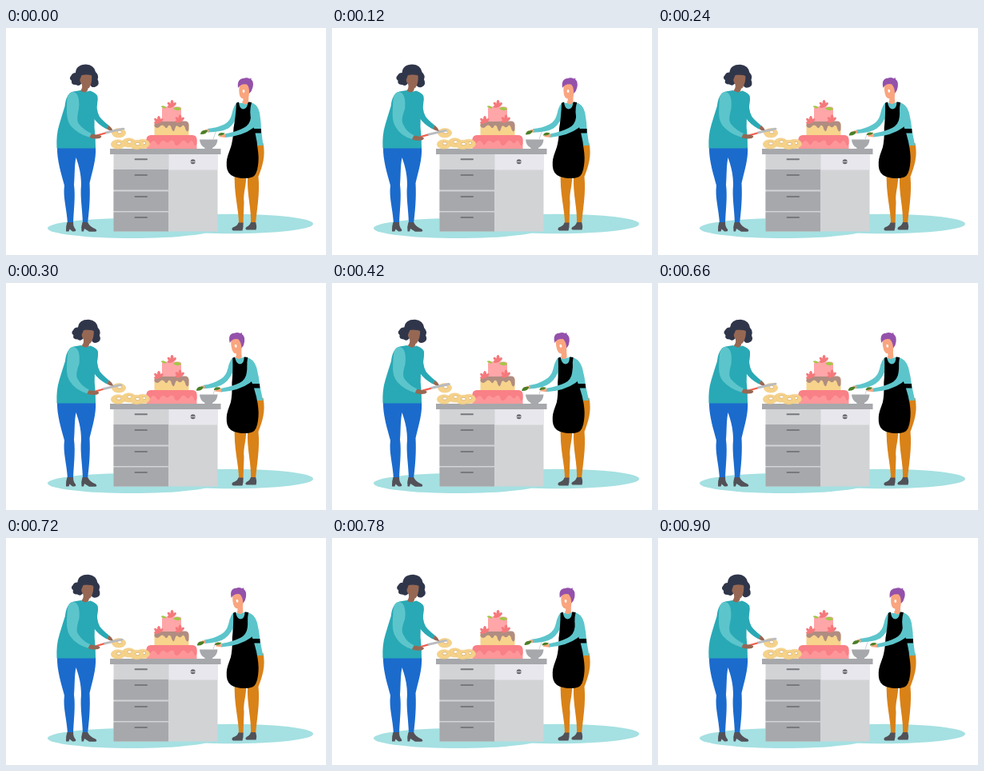
An HTML page for the animation above (0.96 s loop, 400 px wide and 284 px high).

```html
<!DOCTYPE html>
<html lang="en">
<head>
<meta charset="utf-8">
<title>Two bakers at a counter</title>
<style>
html, body { margin: 0; width: 100%; height: 100%; overflow: hidden; background: #fff; }
svg { display: block; width: 100vw; height: 100vh; }
.skinA { fill: #966854; }
.skinB { fill: #f9a57f; }
.hairA { fill: #30364a; }
.teal { fill: #29a9b5; }
.aqua { fill: #5cc5cb; }
.jeans { fill: #1b6bcd; }
.tan { fill: #d98218; }
.shoe { fill: #525158; }
.steel { fill: #a6a8ab; }
.pale { fill: #d1d3d5; }
.coral { fill: #f5797c; }
.leaf { fill: #a3c746; }
.herb { fill: #4c7f25; }
.handle { fill: none; stroke: #77797d; stroke-width: 2; stroke-linecap: round; }
</style>
</head>
<body>
<svg viewBox="0 0 400 284" preserveAspectRatio="none">
  <defs>
    <g id="donut">
      <ellipse rx="8.700" ry="5.800" fill="#f5d28a" stroke="#edc67c" stroke-width=".5"/>
      <ellipse cx="1" cy="-1" rx="2.800" ry="1.700" fill="#fff" stroke="#c99c60" stroke-width=".6"/>
    </g>
    <g id="flower" class="coral">
      <ellipse cx=".5" cy="-4" rx="2" ry="4.500"/>
      <ellipse cy="-3.500" rx="1.800" ry="3.800" transform="rotate(-42)"/>
      <ellipse cy="-3.500" rx="1.800" ry="4" transform="rotate(48)"/>
      <ellipse cy="-2.500" rx="1.500" ry="3" transform="rotate(-88)"/>
    </g>
  </defs>

  <g fill="#a5e0e2">
    <ellipse cx="157.500" cy="250.500" rx="105.500" ry="12.500"/>
    <ellipse cx="282" cy="245" rx="102" ry="12.200"/>
  </g>

  <!-- counter -->
  <path class="pale" d="M134.500 157H264.500V254.500H134.500Z"/>
  <path fill="#e8e7ed" d="M203.500 158H264.500V177.500H203.500Z"/>
  <path class="steel" d="M134.500 177H203V202.500H134.500ZM134.500 204.500H203V229H134.500ZM134.500 230.500H203V254.500H134.500Z"/>
  <path class="handle" d="M161.500 164.300H176M161.500 184H176M161.500 211H176M161.500 237H176"/>
  <circle cx="233.700" cy="167.300" r="3" fill="#66686c"/>
  <path d="M230.500 167.300H237" stroke="#d8d8dc" stroke-width="1"/>
  <path class="steel" d="M130 151H268.500V158H130Z"/>

  <!-- cake -->
  <path fill="#fd9699" d="M175.500 151V140Q175.500 134 182 134H232Q238.500 134 238.500 140V151Z"/>
  <path fill="#f98086" d="M175.500 145V140Q175.500 134 182 134H232Q238.500 134 238.500 140V145Q236 150 234.500 144Q232 138 229.500 143Q227 146 224.500 142Q221 139 218.500 143Q216 147 213.500 147Q210.500 147 210 142Q207 139 204 142Q202 145 199 142Q195 139 192.500 144Q190 149 187.500 143Q184 139 181.500 143Q178 148 175.500 145Z"/>
  <path fill="#f7d38c" d="M185.500 134V121Q186 117 190 117H224Q228 117 228.500 121V134Z"/>
  <path fill="#b08d81" d="M185.500 123V121Q186 116.500 190 116.500H224Q228 116.500 228.500 121V127Q227 132 224.500 127Q223 121 220.500 122Q218 126 215 123Q212.500 121 211.500 125Q209.500 133 207 126Q206 121 203 122Q201 128 198 123Q195 120 192.500 123Q189 127 185.500 123Z"/>
  <path fill="#ffa6a9" d="M195 117V101Q195 98.500 198 98.500H216Q219 98.500 219 101V117Z"/>
  <use href="#flower" x="207" y="98.500"/>
  <use href="#flower" x="190.500" y="118.500"/>
  <use href="#flower" x="217" y="117"/>
  <path class="leaf" d="M209 101Q214 96.500 219.500 101.500Q214 105 209 101ZM201 100Q198 96 193.500 98Q196 101.500 201 100Z"/>

  <!-- bowl -->
  <path d="M259 139L263 127.500" stroke="#d0d2d5" stroke-width="1"/>
  <path class="steel" d="M242 139.500H264.500Q264 147 258 150V151.300H248.500V150Q242.500 147 242 139.500Z"/>

  <!-- donuts -->
  <use href="#donut" x="171" y="145"/>
  <use href="#donut" x="153.500" y="143.500"/>
  <use href="#donut" x="140" y="145.500"/>
  <use href="#donut" x="163.500" y="146"/>
  <use href="#donut" x="141" y="131.300"/>

  <!-- left baker -->
  <path class="jeans" d="M64 149H112C113 164 108 179 104.500 194C105.500 212 104 228 102 245H96C95.500 226 92.500 212 94 196C94 182 91 172 87.500 162C85.500 172 86 182 85 196C87 212 84.500 228 84 245H77C76 226 71 212 73 197C69 182 63.500 165 64 149Z"/>
  <path class="shoe" d="M76.500 243H84Q84 249 87 252Q88 254.500 85 254.500H83L79.500 251.500L78.500 254.500H75Q74.500 248 76.500 243ZM95.500 243H102Q105 249 112 251.500Q115 254.500 111 254.700H104L98 251L97 254.500H94.500Q93.500 249 95.500 243Z"/>
  <g id="farArm">
    <path class="teal" d="M106 84L114.500 88Q111.500 101 117 111Q121 116 128.500 122L125.500 126.500Q114 120 109 112Z"/>
    <path class="skinA" d="M125.500 126L128.500 121.800Q133 125.500 134 129Q130 129.500 125.500 126Z"/>
  </g>
  <g id="bodyA">
    <path class="teal" d="M93 78Q99 80.500 105 78.500Q113 81 114.500 86Q115 94 112 104Q110 114 110.500 124Q112 136 112 150.500H63.500Q62.500 134 66.500 121Q70 109 73.500 98Q75 82 84 79.500Z"/>
  </g>
  <g id="headA">
    <path class="hairA" d="M87 56Q87.500 46 100 45.500Q110 46 112 55Q116.500 59 114.500 64Q118 71 112 73.500Q107 75.500 105 71L95 68Q92 74 87.500 71Q81 71.500 82 66Q78 63 81.500 59.500Q83 56 87 56Z"/>
    <path class="skinA" d="M94.500 57Q101 59 107 57.500Q108 67 105 73Q104 75.500 102.500 75.500Q102.500 79.500 98.500 80.500Q94.500 80 93 78.500Q96 75 94.800 70.500Q91 66 93 63Q94 61 94.500 57Z"/>
    <path class="hairA" d="M92 60Q92 53 100 53Q108 53 109 60Q101 56.500 92 60Z"/>
  </g>
  <g id="knife">
    <path d="M114 134.300L125 131.200" stroke="#f0604f" stroke-width="2.200" stroke-linecap="round"/>
    <path fill="#b9bbbf" d="M124 129.700L146 124.700Q149 124.500 148.500 127L125 132.500Z"/>
    <path class="skinA" d="M104 133Q109 132 113 133.500Q119 133.800 119.500 136Q118 138.800 112 138.500Q106 138.500 104 136Z"/>
  </g>
  <path id="sleeveA" class="aqua"/>

  <!-- right baker -->
  <path class="tan" d="M286 178H300C301.500 196 296 206 297.500 218L296.500 246H291C291.500 228 284 206 286 178Z"/>
  <path class="tan" d="M300 144H321.500C324.500 160 321 172 315.500 186C317.500 208 313.500 226 312 246H306C307 226 301 208 302 186Z"/>
  <path class="shoe" d="M290.500 243.500H296.500Q297 249 295.500 253.500H284Q281 252 283.500 249.500Q289 248 290.500 243.500ZM306 243H312Q314 248 312.500 252.500H301Q298 251.500 300.500 249Q304.500 247.500 306 243Z"/>
  <path id="farSleeve" class="aqua"/>
  <g id="bodyB">
    <path class="aqua" d="M288.500 93Q297 95 304 92.500Q314 94 317 106Q319 118 319 128L321.500 147H285Q286 122 286 108Q285 97 288.500 93Z"/>
    <path d="M288 94L291 92.500Q291.500 101 296.500 101.500Q302 101 302.500 92.500L307 93Q303.500 105 307 117Q309 122 310 126H319V131.500H311.500Q314 142 314.500 151H280.500Q284 140 284.500 125Q287 112 288 94Z"/>
    <g id="headB">
      <path class="skinB" d="M292 70Q297 65 304 69Q306 75 304 82Q303 87 303 93Q299 98 295 93Q297 91 296.500 88.500Q291.500 88.500 291.300 78Z"/>
      <path fill="#9451ab" d="M290 75Q288.500 63.500 297 63Q301 61.500 304.500 63.500L306.500 62.500L306.500 64.500Q310 67 308.500 74Q307.500 79 304 82Q304.500 74 301 70.500Q294 69 290 75Z"/>
      <ellipse cx="297" cy="79" rx="1.400" ry="2" fill="#fff"/>
    </g>
  </g>
  <path d="M280.500 150.500H314.500Q316.500 162 315 172Q313.500 184 308 186.500Q301 189 291 187.500Q279 186 276.500 177Q274.500 168 277.500 159Z"/>
  <path id="nearSleeve" class="aqua"/>
  <g id="herbL">
    <path class="skinB" d="M249 127L253.500 126.500V130.500L249 130Z"/>
    <path class="herb" d="M243 133Q243.500 127 252 128Q251 133.500 243 133Z"/>
  </g>
  <g id="herbR">
    <path class="skinB" d="M266 136Q268 132.500 274.500 133L274 137Z"/>
    <path class="herb" d="M265 134.500Q266 129.500 273.500 131.500Q272 135 265 134.500Z"/>
  </g>
</svg>
<script>
const LOOP = 960, TICK = 60;
// forward lean of the right baker, one value per tick
const LEAN = [0, .05, .17, .45, .72, .86, .94, .97, 1, 1, .97, .9, .7, .43, .17, .02];
const $ = id => document.getElementById(id);
const put = (id, value) => $(id).setAttribute("transform", value);
const move = (id, x, y) => put(id, `translate(${x} ${y})`);

function pose(t) {
  const lean = LEAN[t / TICK];
  const saw = (1 + Math.cos(2 * Math.PI * (t - 120) / 220)) / 2;

  // left baker
  const kx = -4.5 * saw, ky = 2.2 * saw;
  move("knife", kx, ky);
  move("farArm", .6 * lean, 0);
  put("bodyA", `translate(0 150) skewX(${-.5 * lean}) translate(0 -150)`);
  put("headA", `translate(${1.8 * lean} ${.2 * lean}) rotate(${4 * lean} 99 78)`);
  const sx = .6 * lean;
  $("sleeveA").setAttribute("d",
    `M${82 + sx} 80 C${91 + sx} 79 ${92 + sx} 91 ${91 + sx} 101
     C${89 + kx * .3} 111 ${88 + kx * .4} 117 ${92 + kx * .5} ${121 + ky * .4}
     Q${98 + kx} ${128 + ky} ${107 + kx} ${132 + ky}
     L${104.500 + kx} ${136.800 + ky}
     Q${90 + kx} ${132.500 + ky} ${81.500 + kx * .4} ${123 + ky * .4}
     C${75 + kx * .2} 115 76 105 ${76 + sx} 95 Q${76 + sx} 82 ${82 + sx} 80Z`);

  // right baker
  const b = -6 * lean, ly = 2 * lean, ry = -.7 * lean;
  put("bodyB", `translate(0 150) skewX(${5.6 * lean}) translate(0 -150)`);
  put("headB", `translate(${-4 * lean} ${-.3 * lean}) rotate(${-2 * lean} 298 92)`);
  move("herbL", b, ly);
  move("herbR", b, ry);
  $("farSleeve").setAttribute("d",
    `M${290 + b} 92.500 Q${285 + b} 95 ${282.500 + b} 107 Q${280 + b} 117 ${273 + b} 120.500
     Q${263 + b} ${125 + ly} ${252 + b} ${126 + ly} L${252 + b} ${130.500 + ly}
     Q${270 + b} ${130 + ly} ${278 + b} 125.500 Q${287 + b} 119 ${291 + b} 104Z`);
  $("nearSleeve").setAttribute("d",
    `M${307.500 + b * .9} 94 Q${316 + b * .9} 97 ${316.500 + b * .8} 108 Q${316 + b * .7} 120 ${309 + b * .8} 125
     Q${296 + b} 135 ${273.500 + b} ${137 + ry} L${273.500 + b} ${132.500 + ry}
     Q${288 + b} ${130 + ry} ${297 + b} 125 Q${305 + b} 121 ${306 + b} 112Z`);
}

function draw() {
  pose(Math.floor(performance.now() % LOOP / TICK) * TICK);
  requestAnimationFrame(draw);
}
draw();
</script>
</body>
</html>
```
